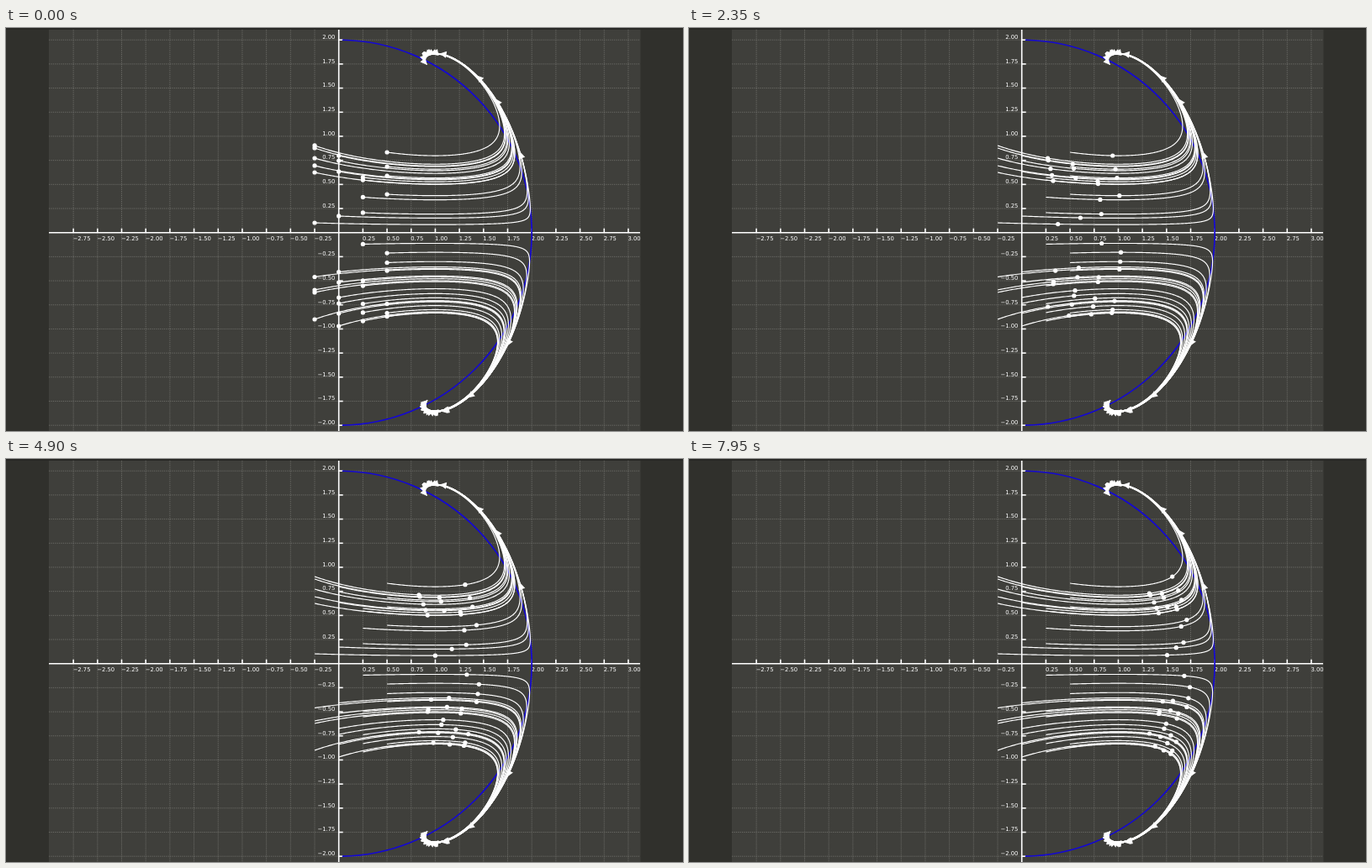
An HTML page with a canvas for the animation above (8000 ms loop, 805 by 480 pixels).

```html
<!DOCTYPE html>
<html lang="en">
<head>
<meta charset="utf-8">
<title>Phase portrait</title>
<style>
html, body { margin: 0; width: 100%; height: 100%; overflow: hidden; background: #30302c; }
canvas { display: block; width: 805px; height: 480px; }
</style>
</head>
<body>
<canvas id="stage" width="805" height="480"></canvas>
<script>
const W = 805, H = 480, LOOP = 8000, STEP = 50;
const UNIT = 114.75, CX = 395.7, CY = 243.7;
const DT = 0.005, T_END = 3;
const ctx = document.getElementById('stage').getContext('2d');

// Starting heights for each starting x
const starts = [
  [-0.25, [0.904, 0.878, 0.773, 0.695, 0.625, 0.102, -0.46, -0.595, -0.621, -0.9]],
  [0, [0.799, 0.747, 0.634, 0.172, -0.408, -0.517, -0.674, -0.735, -0.839, -0.97]],
  [0.25, [0.573, 0.546, 0.368, 0.207, -0.12, -0.499, -0.552, -0.739, -0.83, -0.918]],
  [0.5, [0.834, 0.686, 0.59, 0.398, -0.212, -0.312, -0.395, -0.739, -0.835, -0.87]]
];

// Seconds on screen against time in the flow
const clock = [[0.135, 0], [1.1, 0.0687], [2.35, 0.158], [3.25, 0.2185],
  [4.9, 0.338], [6.15, 0.4277], [7.95, 0.5545], [8, 0.558]];

const px = x => CX + x * UNIT;
const py = y => CY - y * UNIT;
const flow = ([x, y]) => [4 - x * x - y * y, y * (x - 1)];
const along = (p, v, h) => [p[0] + v[0] * h, p[1] + v[1] * h];

function rk4(p) {
  const a = flow(p);
  const b = flow(along(p, a, DT / 2));
  const c = flow(along(p, b, DT / 2));
  const d = flow(along(p, c, DT));
  const mean = [0, 1].map(i => (a[i] + 2 * b[i] + 2 * c[i] + d[i]) / 6);
  return along(p, mean, DT);
}

function trace(x, y) {
  const path = [[x, y]];
  const n = Math.round(T_END / DT);
  for (let i = 0; i < n; i++) path.push(rk4(path[i]));
  return path;
}

const paths = starts.flatMap(([x, ys]) => ys.map(y => trace(x, y)));

function line(g, x1, y1, x2, y2) {
  g.beginPath();
  g.moveTo(x1, y1);
  g.lineTo(x2, y2);
  g.stroke();
}

function drawGrid(g) {
  g.strokeStyle = '#777772';
  g.lineWidth = 0.8;
  g.setLineDash([1.2, 1.2]);
  for (let i = -11; i <= 12; i++) line(g, px(i / 4), 2, px(i / 4), H);
  for (let i = -8; i <= 8; i++) line(g, 51, py(i / 4), 754, py(i / 4));
  g.setLineDash([]);
}

function drawAxes(g) {
  g.strokeStyle = g.fillStyle = '#fff';
  g.lineWidth = 1.6;
  line(g, 51, CY, 754, CY);
  line(g, CX, 2, CX, H);
  g.font = '6.8px "DejaVu Sans", sans-serif';
  const label = v => v.toFixed(2).replace('-', '\u2212');
  for (let i = -11; i <= 12; i++) {
    if (!i) continue;
    const v = i / 4;
    line(g, px(v), CY, px(v), CY - 5);
    g.textAlign = 'left';
    g.fillText(label(v), px(v) - 0.5, 253.3);
    if (Math.abs(i) > 8) continue;
    line(g, CX, py(v), CX + 5, py(v));
    g.textAlign = 'right';
    g.fillText(label(v), 391.3, py(v) - 1.2);
  }
}

function drawArrow(g, path) {
  const [x, y] = path[path.length - 1];
  const [vx, vy] = flow([x, y]);
  g.save();
  g.translate(px(x), py(y));
  g.rotate(Math.atan2(-vy, vx));
  g.beginPath();
  g.moveTo(0, 0);
  g.lineTo(-8, -4);
  g.lineTo(-8, 4);
  g.fill();
  g.restore();
}

function drawPath(g, path) {
  g.beginPath();
  path.slice(0, -3).forEach(([x, y]) => g.lineTo(px(x), py(y)));
  g.stroke();
  drawArrow(g, path);
}

function makeScene() {
  const scene = document.createElement('canvas');
  scene.width = W;
  scene.height = H;
  const g = scene.getContext('2d');
  g.fillStyle = '#30302c';
  g.fillRect(0, 0, W, H);
  g.fillStyle = '#3f3f3b';
  g.fillRect(51, 2, 703.5, H - 2);
  g.fillStyle = '#282825';
  g.fillRect(0, 0, W, 2);
  drawGrid(g);
  drawAxes(g);
  g.strokeStyle = '#1408d2';
  g.lineWidth = 1.7;
  g.beginPath();
  g.arc(CX, CY, 2 * UNIT, -Math.PI / 2 + 0.018, Math.PI / 2 - 0.018);
  g.stroke();
  g.strokeStyle = g.fillStyle = '#fff';
  g.lineWidth = 1.15;
  paths.forEach(path => drawPath(g, path));
  return scene;
}

function flowTime(s) {
  if (s <= clock[0][0]) return 0;
  const i = clock.findIndex(([t]) => t >= s);
  const [s0, t0] = clock[i - 1], [s1, t1] = clock[i];
  return t0 + (t1 - t0) * (s - s0) / (s1 - s0);
}

function pointAt(path, t) {
  const i = Math.floor(t / DT), f = t / DT - i;
  const [a, b] = [path[i], path[i + 1]];
  return [a[0] + (b[0] - a[0]) * f, a[1] + (b[1] - a[1]) * f];
}

const scene = makeScene();
const begin = performance.now();

function draw(now) {
  const ms = Math.max(0, now - begin) % LOOP;
  const t = flowTime(Math.floor(ms / STEP) * STEP / 1000);
  ctx.drawImage(scene, 0, 0);
  ctx.fillStyle = '#fff';
  for (const path of paths) {
    const [x, y] = pointAt(path, t);
    ctx.beginPath();
    ctx.arc(px(x), py(y), 2.6, 0, 2 * Math.PI);
    ctx.fill();
  }
  requestAnimationFrame(draw);
}
draw(begin);
</script>
</body>
</html>
```
